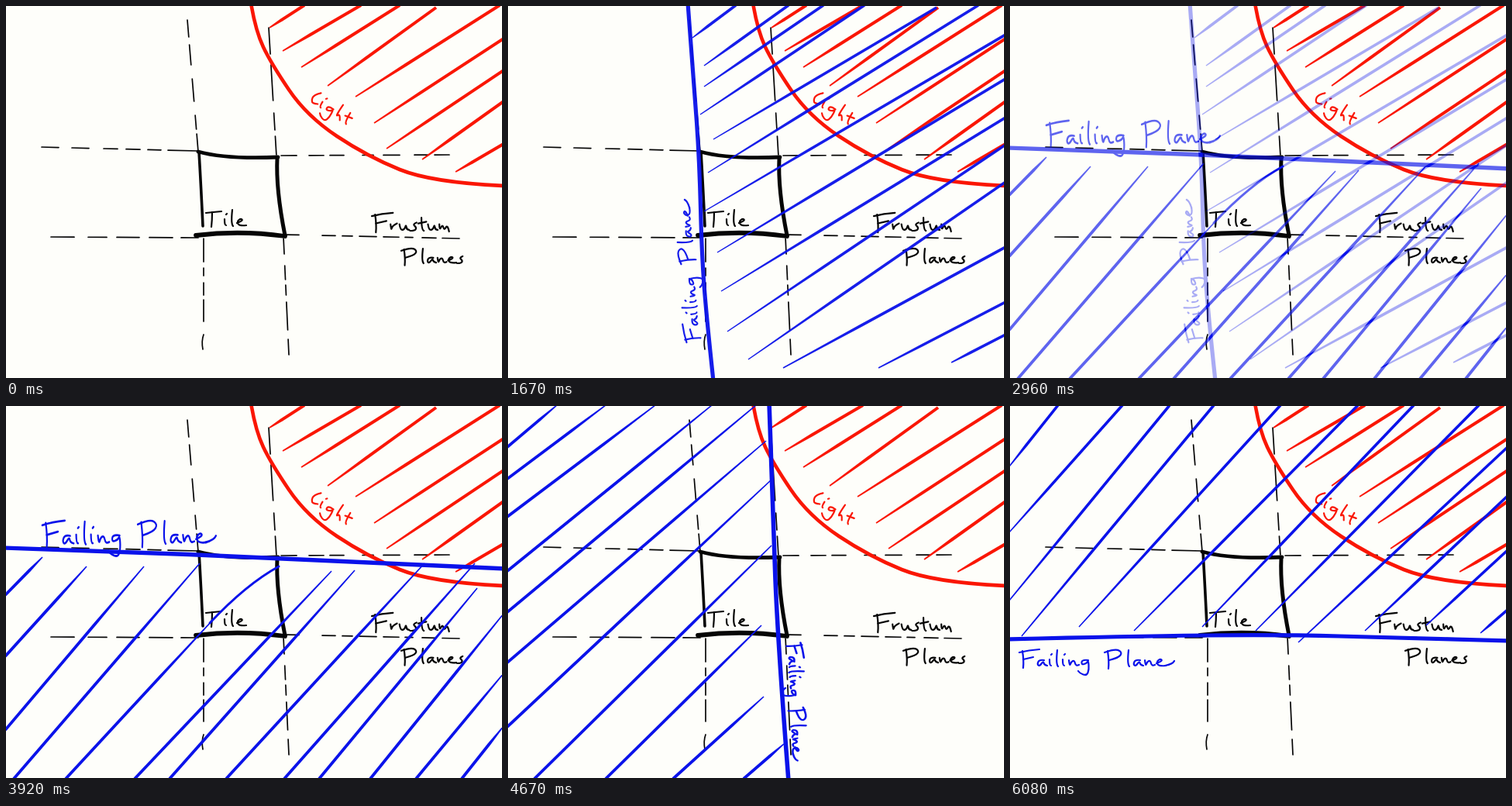
Write an HTML page with a canvas that moves like this. It is 640 px wide and 480 px high and loops after 7 s.

```html
<!DOCTYPE html>
<html lang="en">
<head>
<meta charset="utf-8">
<title>Tile frustum culling</title>
<style>
html, body { margin: 0; width: 100%; height: 100%; overflow: hidden; background: #fefefa; }
canvas { display: block; }
</style>
</head>
<body>
<canvas id="stage" width="640" height="480" role="img" aria-label="Tile, Light, Frustum Planes, Failing Plane"></canvas>
<script>
const W = 640, H = 480, LOOP = 7000, FADE = 600;
const FADE_STARTS = [1070, 2570, 3975, 5380];
const PAPER = '#fefefa', BLACK = '#050505', RED = '#fa1604', BLUE = '#0a12ea';

const nums = text => text.trim().split(/[\s,]+/).map(Number);

// Pen strokes per letter on a baseline of 0; the first entry is the advance.
const GLYPHS = {
  F: [22, '4 -20 6 -8 5 2', '0 -18 12 -21 26 -22', '5 -9 18 -12'],
  P: [28, '4 -20 6 -6 5 3', '0 -18 14 -23 23 -18 18 -11 6 -8'],
  T: [22, '0 -17 9 -18 20 -19', '8 -18 8 -8 7 1'],
  L: [14, '8 -18 1 -11 2 -3 6 0 12 -3'],
  a: [15, '10 -8 4 -9 1 -3 4 0 9 -7 10 -2 14 -1'],
  e: [14, '1 -4 9 -7 6 -10 1 -6 4 0 13 -1'],
  g: [16, '11 -8 3 -9 2 -2 9 -4 11 -8 12 4 9 12 0 9 -2 6'],
  h: [13, '3 -20 2 0 6 -8 10 0'],
  i: [9, '2 -9 2 -1 4 -1', '4 -15 5 -16'],
  l: [8, '3 -21 1 -3 4 0'],
  m: [14, '1 -8 1 0 5 -8 7 0 11 -8 13 1'],
  n: [15, '1 -8 2 0 4 -6 8 -8 10 0 14 -2'],
  r: [11, '1 -8 2 0 3 -6 9 -9'],
  s: [10, '8 -10 3 -8 8 -4 6 0 0 0'],
  t: [11, '4 -16 4 -1 7 0', '0 -9 10 -11'],
  u: [14, '1 -8 2 -1 7 -1 9 -8 10 -1 13 -1'],
  '~': [10, '-2 -1 8 -3 10 -7'],
  ' ': [16]
};

function brush(c, points, width, color) {
  const p = nums(points), last = p.length - 2;
  c.lineWidth = width;
  c.strokeStyle = color;
  c.lineCap = c.lineJoin = 'round';
  c.beginPath();
  c.moveTo(p[0], p[1]);
  for (let i = 2; i < last; i += 2) {
    const end = i + 2 === last;
    c.quadraticCurveTo(p[i], p[i + 1],
      end ? p[last] : (p[i] + p[i + 2]) / 2,
      end ? p[last + 1] : (p[i + 1] + p[i + 3]) / 2);
  }
  if (last === 2) c.lineTo(p[2], p[3]);
  c.stroke();
}

// Each row is one line that swells from a thin tip to its full width.
function hatch(c, rows, width, color) {
  c.fillStyle = color;
  for (const row of rows.split(',')) {
    const [x0, y0, x1, y1] = nums(row);
    const dx = x1 - x0, dy = y1 - y0, len = Math.hypot(dx, dy);
    const nx = -dy / len * width / 2, ny = dx / len * width / 2;
    const mx = x0 + dx * 0.35, my = y0 + dy * 0.35;
    c.beginPath();
    c.moveTo(x0 - nx * 0.4, y0 - ny * 0.4);
    c.lineTo(mx - nx, my - ny);
    c.lineTo(x1 - nx, y1 - ny);
    c.lineTo(x1 + nx, y1 + ny);
    c.lineTo(mx + nx, my + ny);
    c.lineTo(x0 + nx * 0.4, y0 + ny * 0.4);
    c.fill();
  }
}

// Spans are start and end positions along the longer axis of the line.
function dashes(c, line, spans) {
  const [x0, y0, x1, y1] = nums(line), s = nums(spans);
  const flat = Math.abs(x1 - x0) > Math.abs(y1 - y0);
  const at = v => flat
    ? `${v} ${y0 + (y1 - y0) * (v - x0) / (x1 - x0)}`
    : `${x0 + (x1 - x0) * (v - y0) / (y1 - y0)} ${v}`;
  for (let i = 0; i < s.length; i += 2) brush(c, `${at(s[i])} ${at(s[i + 1])}`, 1.7, BLACK);
}

function write(c, text, x, y, { size = 1, tall = 1, angle = 0, width = 2.2, color = BLACK } = {}) {
  c.save();
  c.translate(x, y);
  c.rotate(angle);
  c.scale(size, size * tall);
  for (const letter of text) {
    const [advance, ...strokes] = GLYPHS[letter];
    for (const s of strokes) brush(c, s, width / size, color);
    c.translate(advance, 0);
  }
  c.restore();
}

function drawBase(c) {
  c.fillStyle = PAPER;
  c.fillRect(0, 0, W, H);

  dashes(c, '234 18 248 188', '18 40 50 76 94 123 141 159 165 187');
  dashes(c, '339 28 349 194', '28 62 76 122 138 160 168 192');
  dashes(c, '45 182 248 187', '46 68 85 107 126 144 155 173 183 200 209 248');
  dashes(c, '355 193 572 192', '355 375 391 410 418 436 460 474 487 508 527 545 553 572');
  dashes(c, '58 298 248 299', '58 88 106 130 143 172 185 215 226 248');
  dashes(c, '360 295 585 300', '362 378 408 425 434 447 456 478 487 507 515 525 537 555 563 585');
  dashes(c, '255 298 255 443', '300 330 338 348 357 373 379 407');
  brush(c, '255 424 252 432 254 443', 1.7, BLACK);
  dashes(c, '358 298 365 450', '300 320 335 353 360 373 382 418 430 450');

  brush(c, '248 188 285 198 351 195', 4.8, BLACK);
  brush(c, '249 188 252 240 254 284', 3.6, BLACK);
  brush(c, '350 196 348 236 360 296', 5, BLACK);
  brush(c, '245 296 302 289 360 297', 5.8, BLACK);

  write(c, 'Tile', 258, 284);
  write(c, 'Frustum', 472, 290, { size: 1.05 });
  write(c, 'Planes', 510, 332, { size: 0.9 });

  brush(c, '316 -4 322 32 342 74 388 142 466 194 550 228 644 232', 4.6, RED);
  hatch(c, `340 28 385 -1, 357 58 458 -1, 381 79 508 -1, 415 103 555 2, 451 117 637 -1,
    475 151 642 42, 491 184 642 83, 537 198 642 123, 580 214 642 178`, 4, RED);
  write(c, 'Light', 391, 123, { size: 0.95, angle: 0.55, color: RED });
}

const planes = [
  c => {
    brush(c, '232 -4 240 100 247 200 250 320 256 400 265 484', 5.2, BLUE);
    hatch(c, `238 41 294 -1, 253 77 362 -1, 253 104 407 -1, 248 140 460 -1, 265 172 553 2,
      258 215 607 -1, 253 265 642 37, 270 318 642 94, 275 368 642 144, 283 420 642 179,
      310 456 642 227, 355 467 642 311, 478 467 642 382, 572 460 642 424`, 3.6, BLUE);
    write(c, 'Failing Plane~', 247, 433, { size: 0.92, angle: -1.64, color: BLUE });
  },
  c => {
    brush(c, '-4 183 120 187 350 196 644 210', 5.4, BLUE);
    hatch(c, `47 195 -1 244, 104 207 -1 323, 178 207 -1 418, 250 203 10 481, 265 278 77 481,
      420 213 166 481, 450 212 211 481, 540 203 284 481, 605 203 359 481, 608 235 404 481,
      642 268 470 481, 642 345 529 481, 642 413 588 481`, 3.8, BLUE);
    brush(c, '352 207 310 230 263 280', 3, BLUE);
    write(c, 'Failing Plane~', 47, 179, { size: 1.12, tall: 1.25, angle: -0.008, color: BLUE });
  },
  c => {
    brush(c, '337 -4 342 130 347 290 362 484', 5.6, BLUE);
    hatch(c, `63 -1 -1 53, 126 -1 -1 94, 190 -1 -1 143, 263 -1 -1 213, 320 -1 -1 266,
      333 45 -1 331, 340 95 -1 414, 340 180 34 481, 327 283 126 481, 330 375 213 481,
      356 436 304 481`, 3.8, BLUE);
    write(c, 'Failing Plane~', 361, 306, { size: 0.76, tall: 1.2, angle: 1.53, color: BLUE });
  },
  c => {
    brush(c, '-4 301 150 297 350 295 500 299 644 303', 5.2, BLUE);
    hatch(c, `-1 78 62 -1, -1 163 145 -1, -1 251 206 -1, 15 297 263 -1, 89 285 349 -1,
      160 290 449 -1, 248 285 521 -1, 317 290 605 -1, 372 305 642 53, 458 290 642 116,
      537 283 642 186, 607 293 642 263`, 3.6, BLUE);
    write(c, 'Failing Plane~', 12, 336, { color: BLUE });
  }
];

function picture(...layers) {
  const canvas = document.createElement('canvas');
  canvas.width = W;
  canvas.height = H;
  const c = canvas.getContext('2d');
  layers.forEach(draw => draw(c));
  return canvas;
}

const scenes = [picture(drawBase), ...planes.map(plane => picture(drawBase, plane))];
const ctx = document.getElementById('stage').getContext('2d');

function render(now) {
  const t = Math.floor((now % LOOP) / 40) * 40;
  ctx.globalAlpha = 1;
  ctx.drawImage(scenes[0], 0, 0);
  FADE_STARTS.forEach((start, i) => {
    ctx.globalAlpha = Math.min(1, Math.max(0, (t - start) / FADE));
    ctx.drawImage(scenes[i + 1], 0, 0);
  });
}

const begin = performance.now();
function tick() {
  render(performance.now() - begin);
  requestAnimationFrame(tick);
}
tick();
</script>
</body>
</html>
```
